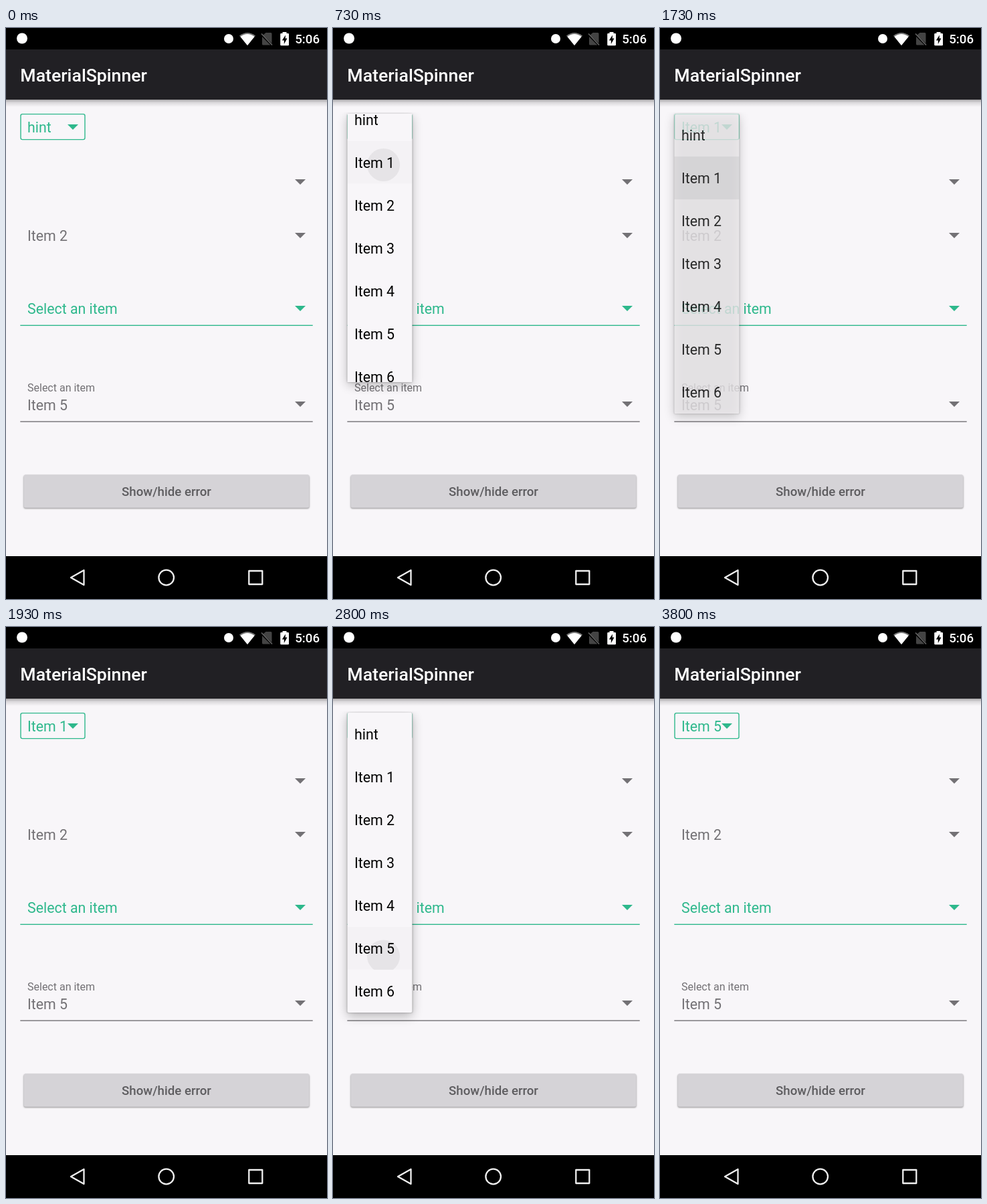
Recreate the animation shown at these times as an HTML page. Size 480 by 853 pixels, loop 3.87 s.

```html
<!DOCTYPE html>
<html lang="en">
<head>
<meta charset="utf-8">
<title>Spinner demo</title>
<style>
  html, body { margin: 0; width: 100%; height: 100%; overflow: hidden; background: #f8f6f9; }
  svg { display: block; }
  body > svg { width: 100vw; height: 100vh; }
  text { font-family: Roboto, sans-serif; font-size: 21.33px; white-space: pre; }
  .green { fill: #2eb88c; }
  .grey { fill: #737175; }
  .medium { font-weight: 500; }
</style>
</head>
<body>
<svg viewBox="0 0 480 853">
  <defs>
    <linearGradient id="barShade" x2="0" y2="1">
      <stop offset="0" stop-color="#000" stop-opacity=".32"/>
      <stop offset=".4" stop-color="#000" stop-opacity=".12"/>
      <stop offset="1" stop-color="#000" stop-opacity="0"/>
    </linearGradient>
    <filter id="blur" filterUnits="userSpaceOnUse" x="-30" y="90" width="220" height="540">
      <feGaussianBlur stdDeviation="8"/>
    </filter>
    <filter id="soft" x="-5%" y="-20%" width="110%" height="140%">
      <feGaussianBlur stdDeviation="1.2"/>
    </filter>
    <clipPath id="reveal"><rect id="revealBox" x="21.3" y="128" width="97.3" height="448"/></clipPath>
    <clipPath id="stage"><rect y="126" width="480" height="480"/></clipPath>
    <path id="arrow" d="M-8-4H8L0 4Z"/>
  </defs>

  <rect width="480" height="853" fill="#f8f6f9"/>

  <!-- form -->
  <rect x="22" y="128.6" width="96" height="38" rx="2.6" fill="none" stroke="#2eb88c" stroke-width="1.4"/>
  <text id="value" class="green" x="32" y="156">hint</text>
  <use href="#arrow" class="green" x="100" y="148"/>
  <use href="#arrow" class="grey" x="440" y="230"/>
  <text class="grey" x="32" y="318">Item 2</text>
  <use href="#arrow" class="grey" x="440" y="310"/>
  <text class="green" x="32" y="427">Select an item</text>
  <use href="#arrow" class="green" x="440" y="419"/>
  <rect class="green" x="21.3" y="443.6" width="437.4" height="1.4"/>
  <text class="grey" x="32" y="542.5" style="font-size:16px">Select an item</text>
  <text class="grey" x="32" y="570.5">Item 5</text>
  <use href="#arrow" class="grey" x="440" y="562"/>
  <rect class="grey" x="21.3" y="587.3" width="437.4" height="1.4"/>

  <rect x="26.5" y="668.5" width="427" height="49.5" rx="2.7" opacity=".38" filter="url(#soft)"/>
  <rect x="26.7" y="667.3" width="426.6" height="49.4" rx="2.7" fill="#d5d3d7"/>
  <text class="medium" x="240" y="698.5" text-anchor="middle" fill="#5d5c5f" style="font-size:18.67px">Show/hide error</text>

  <!-- app bar -->
  <rect y="107" width="480" height="11" fill="url(#barShade)"/>
  <rect y="32" width="480" height="75" fill="#212024"/>
  <text class="medium" x="21.3" y="79.5" fill="#fff" style="font-size:26.67px">MaterialSpinner</text>

  <!-- status bar -->
  <rect width="480" height="32"/>
  <g fill="#fff">
    <circle cx="24" cy="15.5" r="8"/>
    <circle cx="333" cy="16" r="7"/>
    <path d="M349 11.5Q361 2.5 373 11.5L361 26Z" fill="#777"/>
    <path d="M350.5 13Q361 5 371.500 13L361 26Z"/>
    <path d="M413.500 8V6h6v2h2.200q1.300 0 1.300 1.300V25q0 1.300-1.300 1.300H411.500q-1.300 0-1.300-1.300V9.300Q410.200 8 411.500 8Z"/>
    <path d="M418 10.500L412.800 18.500H415.800V24L420.500 15.500H417.600Z" fill="#000"/>
    <text class="medium" x="469" y="23" text-anchor="end" style="font-size:18.67px">5:06</text>
  </g>
  <path d="M388.500 7H396q1.500 0 1.500 1.500V23L384.500 10.500ZM383 13L395.500 25.500H384.500Q383 25.500 383 24Z" fill="#444"/>
  <path d="M382 8.500L398 25.500" stroke="#666" stroke-width="1.600"/>

  <!-- navigation bar -->
  <rect y="789" width="480" height="64"/>
  <g fill="none" stroke="#f0f0f0" stroke-width="2.300" stroke-linejoin="round">
    <path d="M97 821L116.500 810V832Z"/>
    <circle cx="239.700" cy="821" r="11.300"/>
    <rect x="363.300" y="811" width="20" height="20"/>
  </g>

  <!-- dropdown -->
  <g id="popup">
    <g clip-path="url(#stage)">
      <rect id="shade" x="21.300" width="97.300" rx="3" filter="url(#blur)"/>
      <rect id="edge" x="20.800" y="128.500" width="98.300" rx="2" opacity=".1" filter="url(#soft)"/>
    </g>
    <g clip-path="url(#reveal)">
      <g id="panel">
        <rect x="21.300" y="128" width="97.300" height="448" rx="2.600" fill="#f8f6f9"/>
        <svg id="row" x="21.300" width="97.300" height="64" overflow="hidden">
          <rect width="98" height="64" opacity=".015"/>
          <circle id="ripple" cx="54.200" opacity=".06"/>
        </svg>
        <g id="items"></g>
      </g>
    </g>
  </g>
</svg>
<script>
const LOOP = 3870, STEP = 1000 / 15;
const REVEAL = 250, FADE_IN = 50, FADE_OUT = 250;
const TOP = 128, ROW = 64, FULL = 448, ANCHOR = 40;

const visits = [
  { open: 591, press: 1533, leave: 1671, item: 1, touchY: 36 },
  { open: 2556, press: 3533, leave: 3550, item: 5, touchY: 44 }
];

const $ = id => document.getElementById(id);
const set = (id, attrs) => {
  for (const key in attrs) $(id).setAttribute(key, attrs[key]);
};
const clamp = v => Math.max(0, Math.min(1, v));

$('items').innerHTML = Array.from({ length: 7 }, (_, i) =>
  `<text x="32" y="${TOP + 40 + i * ROW}">${i ? 'Item ' + i : 'hint'}</text>`).join('');

// cubic-bezier(0, 0, .2, 1)
function slowIn(x) {
  let lo = 0, hi = 1;
  for (let i = 0; i < 24; i++) {
    const s = (lo + hi) / 2;
    if (0.6 * s * s * (1 - s) + s ** 3 < x) lo = s; else hi = s;
  }
  return lo * lo * (3 - 2 * lo);
}

function drawPopup(t, v) {
  const grow = slowIn(clamp((t - v.open) / REVEAL));
  const alpha = clamp((t - v.open) / FADE_IN) * clamp(1 - (t - v.leave) / FADE_OUT);
  const hidden = (FULL - ANCHOR) * (1 - grow);
  const height = FULL - hidden;
  const pressed = t >= v.press - 1;

  set('popup', { display: alpha > 0 ? 'inline' : 'none' });
  set('shade', { y: TOP + 5 * grow, height, opacity: 0.27 * grow * alpha });
  set('edge', { height, opacity: 0.22 * alpha });
  set('revealBox', { height });
  set('panel', { transform: `translate(0 ${-hidden / 2})`, opacity: alpha });
  set('row', { y: TOP + v.item * ROW, display: pressed ? 'inline' : 'none' });
  set('ripple', { cy: v.touchY, r: 24.5 + 0.35 * Math.max(0, t - v.press) });
}

function render(time) {
  // the screen refreshes 15 times a second
  const t = Math.floor((time % LOOP) / STEP + 0.06) * STEP;
  const visit = visits.find(v => t >= v.open && t < v.leave + FADE_OUT);
  const chosen = visits.filter(v => t >= v.leave - 20).pop();

  $('value').textContent = chosen ? 'Item ' + chosen.item : 'hint';
  if (visit) drawPopup(t, visit);
  else set('popup', { display: 'none' });
}

const start = performance.now();
function tick() {
  render(performance.now() - start);
  requestAnimationFrame(tick);
}
tick();
</script>
</body>
</html>
```
